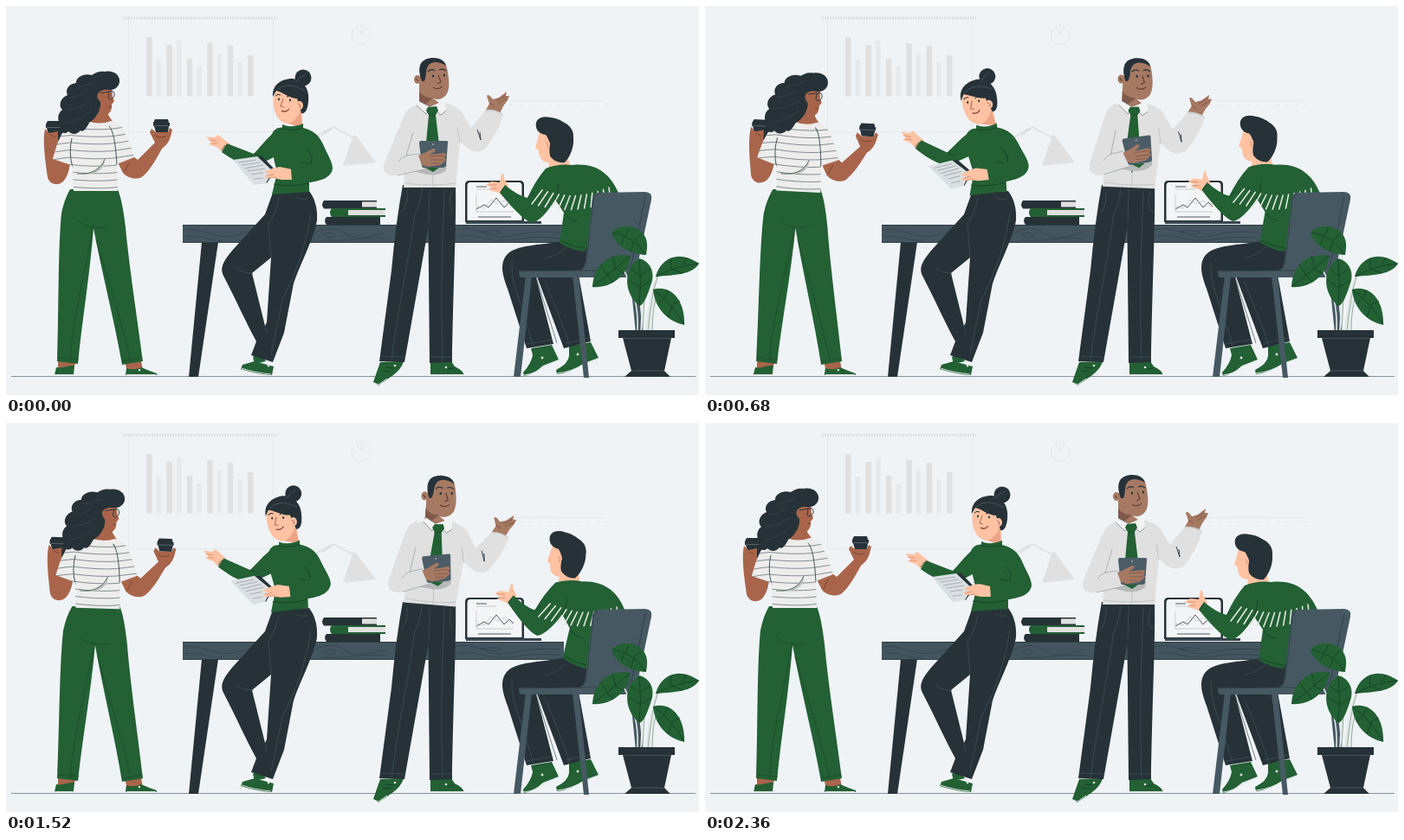
Animation, 800 px wide and 450 px high, one loop 2400 ms. Source, as an HTML page with a canvas:

```html
<!DOCTYPE html>
<html lang="en">
<head>
<meta charset="utf-8">
<title>Office meeting</title>
<style>
html, body { margin: 0; width: 100%; height: 100%; overflow: hidden; background: #eff3f6; }
canvas { display: block; width: 800px; height: 450px; }
</style>
</head>
<body>
<canvas id="stage" width="800" height="450"></canvas>
<script>
const ctx = document.getElementById("stage").getContext("2d");
const LOOP = 2400;
const DARK = "#263238", GREEN = "#236034", SLATE = "#465963", PAPER = "#eff3f6", GREY = "#e0e0e0",
  BROWN = "#a9654b", PEACH = "#ffc2a2", TAN = "#a67963", CREASE = "#43545c";

const cache = new Map();
function shape(d) {
  if (!cache.has(d)) cache.set(d, new Path2D(d));
  return cache.get(d);
}
function fill(color, ...paths) {
  ctx.fillStyle = color;
  for (const d of paths) ctx.fill(shape(d));
}
function line(color, width, ...paths) {
  ctx.strokeStyle = color;
  ctx.lineWidth = width;
  for (const d of paths) ctx.stroke(shape(d));
}
function box(color, x, y, w, h) {
  ctx.fillStyle = color;
  ctx.fillRect(x, y, w, h);
}
function dot(color, x, y, rx, ry = rx) {
  ctx.fillStyle = color;
  ctx.beginPath();
  ctx.ellipse(x, y, rx, ry, 0, 0, 7);
  ctx.fill();
}
// Draws a part turned around a joint and then shifted.
function turn(x, y, angle, dx, dy, draw) {
  ctx.save();
  ctx.translate(x + dx, y + dy);
  ctx.rotate(angle);
  ctx.translate(-x, -y);
  draw();
  ctx.restore();
}
function smooth(t, from, to) {
  const k = Math.min(1, Math.max(0, (t - from) / (to - from)));
  return k * k * (3 - 2 * k);
}
const sway = (t, a, b, c, d) => smooth(t, a, b) - smooth(t, c, d);

function backdrop() {
  box(PAPER, 0, 0, 800, 450);
  for (let i = 0; i < 11; i++) {
    const top = [36, 62, 45, 40, 61, 70, 43, 55, 46, 65, 57][i];
    box(i % 2 ? "#e7e9eb" : GREY, 162 + i * 11.7, top, i % 2 ? 5.5 : 6.5, 104.5 - top);
  }
  ctx.setLineDash([2, 1]);
  line("#e1e4e6", 1, "M141.5 16V145.5H308.5V16", "M578 109.5H692");
  line("#dde0e2", 3, "M135 14H313");
  line("#dde0e2", 1, "M403 26A10.5 10.5 0 1 0 417 26M406 22V28L410 32L414 28V22M410 20V33");
  ctx.setLineDash([5, 6]);
  line("#e6e9eb", 1, "M581 114.5H700");
  ctx.setLineDash([]);
  line("#d6d9db", 1.2, "M340 167L362 148L378 140L402 153M364 150L376 142");
  fill(GREY, "M401 149L404 150L427 181L389 185Z");
  line("#6d7980", .8, "M6 428.5H796");
}

function desk() {
  fill(DARK, "M226 273H245L222 429H211Z");
  box("#43565f", 204, 253, 440, 21);
  line("#2d3b43", 1, "M204 253.5H644M204 273.5H644");
  line("#33434b", .8,
    "M205 259C230 256 240 270 262 266S285 255 310 260M206 267C225 264 230 272 250 271",
    "M357 262C370 256 382 256 392 263S412 270 436 262M366 264C376 259 386 267 372 268Z",
    "M365 271C390 273 405 267 440 269M518 259C540 253 548 265 568 267S592 258 640 262",
    "M520 267C540 262 550 272 575 271S605 265 640 269M548 261C566 258 580 262 566 264Z");
  fill(DARK, "M367 225H428V234.5H367Q363 230 367 225Z", "M370 244H432V253H370Q366 248 370 244Z");
  fill(GREEN, "M376 234H438V244H376Q372 239 376 234Z");
  box(GREY, 411, 226.5, 17, 6);
  box(GREY, 395, 236, 43, 6);
  fill(DARK, "M535 202H593Q598 202 598 207V250H530V207Q530 202 535 202Z");
  fill("#f3f5f6", "M536 204H592Q595.5 204 595.5 208V248H532.5V208Q532.5 204 536 204Z");
  box("#37474f", 531, 249, 87, 3);
  line(DARK, .8, "M543 209H555M545 244H583", "M543 235L552 230L557 233L566 222L575 233L581 227L586 232");
  line("#aeb7bb", .6, "M543 212H566M543 238H586M544 232L552 234L560 224L568 229L575 225L585 233M543 218V238");
}

function coffeeCup(x, y) {
  fill(DARK, `M${x + 2} ${y}H${x + 17}L${x + 18} ${y + 4}H${x + 19}V${y + 8}H${x + 18}L${x + 17} ${y + 15}H${x + 3}L${x + 1} ${y + 8}H${x}V${y + 4}Z`);
  line("#6b777d", .7, `M${x + 1} ${y + 7.5}H${x + 18}`);
}

function coffeeWoman(p) {
  ctx.save();
  ctx.transform(1, 0, -5 * p / 202, 1, 5 * p / 202 * 415, 0);
  fill(BROWN, "M60 410H81L78 420L60 422Z", "M137 411H156L158 421L140 423Z");
  fill(GREEN, "M58 418C66 420 72 415 79 416L78 427H56Z", "M139 419Q148 422 156 418Q165 422 174 425V427H138Z");
  line("#dfe4e4", 1, "M56 426.5H78M139 426.5H173");
  dot(GREY, 154, 421, 1.3);
  fill(GREEN, "M74 212H129C134 225 136 240 138 256C142 300 152 365 158 411L134 415C125 363 111 310 101 257C97 310 88 362 83 414L59 411C61 350 60 280 64 240Q67 224 74 212Z");
  line("#1a4828", .7, "M83 248Q90 255 99 255Q109 258 117 254M100 255C96 290 77 355 74 412", "M60 407L84 409M134 411L157 407M104 270C118 320 137 374 144 412");
  ctx.restore();

  turn(100, 213, .06 * p, 5 * p, .7 * p, () => {
    coffeeCup(46, 133);
    fill(BROWN, "M44 149L45 142L50 147L60 145L63 149L61 156L58 163V174L74 182C73 191 70 199 66 203C59 209 50 206 48 198C46 183 43 165 44 149Z");
    fill(DARK, "M60 146L68 138L73 154L65 159L60 155Z");
    coffeeCup(170, 131);
    fill(BROWN, "M129 181L147 174L152 178L172 158L166 146L168 142L173 146L187 146L189 141L192 143L190 151C188 158 184 162 180 165C173 178 166 190 158 197C151 202 140 199 135 193Z",
      "M97 108L119 108L118 126L124 135Q108 142 92 134Z", "M104 97L122 94L123 105L125 110L122 114C123 124 116 128 108 125Z");
    line("#6f3d2d", .8, "M171 149L176 152L185 151M51 149L57 152M118 117L122 116M142 181L137 192");
    const tee = "M80 134Q86 132 94 133Q108 138 121 133Q129 134 133 139C140 151 145 164 148 175L128 183L129 214H78L77 185L72 183L54 177C57 165 63 147 70 140Z";
    fill("#ededec", tee);
    ctx.save();
    ctx.clip(shape(tee));
    for (let y = 141; y < 214; y += 8.5)
      line("#6b767a", .8, `M53 ${y + 3}Q64 ${y + 1} 74 ${y}Q102 ${y + 3} 124 ${y + 1}L150 ${y - 3}`);
    line("#43575a", 1, "M119 139Q126 146 128 184M76 153Q72 170 77 187");
    fill("#b9c1be", "M81 194C94 196 108 190 114 177C115 188 104 198 81 194Z");
    line("#425b50", .8, "M82 194C98 195 109 190 114 177");
    ctx.restore();
    fill(DARK, "M131 88C132 80 124 74 114 76C106 75 103 78 99 80C90 77 80 83 81 89C72 90 68 97 71 103C63 106 60 115 65 120C58 125 60 134 63 139C58 145 68 150 72 145C77 150 83 148 86 144C90 147 94 139 96 135C104 130 110 120 109 111Q104 106 106 101Q111 96 117 97C125 98 130 94 131 88Z");
    line("#3c4950", .7, "M83 94Q94 92 104 87M73 106Q87 105 96 96M70 120Q85 119 99 109M68 136Q85 133 99 120");
    line(DARK, .9, "M109 101L119 99M119 99Q126 97 125 104Q121 111 118 106Z");
  });
}

function notesWoman(p) {
  fill(GREEN, "M285 406L293 401L300 411L287 414Z", "M273 415L287 411L309 417L307 427Q290 426 271 420Z");
  line("#dfe4e4", 1, "M272 419Q286 424 306 426");
  dot(GREY, 303, 416, 1.4);
  fill(DARK, "M308 216L350 214C356 222 360 233 359 248C355 272 334 309 331 326L321 378L308 412L283 404L289 388C277 366 265 339 252 314C246 304 250 296 261 283L299 241Z");
  fill(PAPER, "M284 309L306 291L301 366L299 370Z");
  line(CREASE, .7, "M315 222Q311 242 303 252L306 291M348 223Q340 225 334 221M352 240Q345 290 319 340L306 403M285 309Q272 309 266 303M299 370L301 379");

  const torso = draw => turn(330, 215, -.065 * p, -2 * p, 0, draw);
  torso(() => {
    turn(318, 152, .148 * p, 0, 0, () => {
      fill(PEACH, "M231 151L241 152L245 149L250 153L259 160L252 171L243 163L234 160L237 157Z");
      line("#c78065", .7, "M234 155L243 156M237 159L244 159");
      fill(GREEN, "M322 139C308 143 296 161 286 171L255 159L249 169C260 177 273 184 282 185C292 184 304 178 318 170Z");
      line("#163e23", .7, "M286 171L296 174M253 161L249 167");
    });
  });
  turn(331, 137, -.23 * p, -7.5 * p, -.2 * p, () => {
    dot(DARK, 343, 83, 9.5);
    fill(PEACH, "M312 95Q307 107 309 117C311 129 317 135 326 136L342 141V116L338 100Z");
    fill("#eaa486", "M326 136Q336 132 340 121L342 140Z");
    fill(DARK, "M308 105C307 90 319 84 331 84C344 86 351 97 349 111C348 121 345 125 341 124L336 107C328 107 318 99 312 98Q310 101 308 105Z");
    dot(PEACH, 339, 115, 4, 5);
    line("#536067", .7, "M313 97Q325 86 345 98M334 88Q338 83 346 79");
    line(DARK, 1, "M311 104Q314 101 317 103M324 105Q328 102 332 105");
    dot(DARK, 315, 108, 1, 1.4);
    dot(DARK, 328, 109, 1, 1.4);
    line("#a65e49", .9, "M320 107L317 116L321 117M337 113Q341 114 339 118");
    line("#7a3029", 1.1, "M318 121Q323 124 327 119");
  });
  torso(() => {
    fill(GREEN, "M319 137Q330 142 343 136V141C356 144 362 151 366 160C371 172 377 180 377 188C375 199 364 202 350 204L350 215L307 218L313 193C310 177 302 157 308 146Q312 140 319 141Z");
    line("#153d22", .8, "M319 142Q331 145 343 141M309 206Q328 210 349 205M347 166Q357 175 351 184L331 190M340 181Q346 181 351 184");
    turn(330, 193, -.06 * p, 0, 0, () => {
      fill(DARK, "M289 175L296 174L311 190L301 205L297 202Z");
      fill("#dadfe2", "M262 178L290 174L308 191L300 205L286 207Z");
      line("#8f9a9f", .7, "M268 181L289 178M272 184L293 181M275 188L297 184M279 191L299 188M283 195L297 193M286 200L297 199");
      fill(PEACH, "M298 192L307 188L316 186L330 189V201L318 201L309 199L300 199L298 196L306 195Z");
      line("#c78065", .7, "M301 196L309 195M304 199L312 198");
      fill(GREEN, "M329 188L351 183L375 185C377 196 367 201 350 204L330 203Z");
    });
  });
}

function standingMan(body, head, arm) {
  fill(GREEN, "M432 412L459 411C455 425 440 431 430 439L424 435Z", "M490 411H514L518 417Q527 421 529 427H490Z");
  line("#dfe4e4", 1, "M425 436L430 438L440 431M490 426.5H529");
  line("#13351f", .8, "M438 418L447 419M435 422L444 423M510 420L517 419");
  dot(GREY, 449, 416, 1.3);
  dot(GREY, 508, 418, 1.3);
  fill(DARK, "M458 207H492L490 242L460 412L431 411L445 306Q450 250 458 207Z", "M487 207H519C520 250 517 300 515 412L489 413Z");
  line(CREASE, .7, "M489 212L488 250M480 211Q478 230 472 241C463 305 452 355 445 410M506 213Q501 325 504 411M463 213Q464 230 457 239M432 405L460 406M490 406H515M514 214Q509 232 517 239");

  const torso = draw => turn(489, 208, .085 * body, 0, 0, draw);
  torso(() => {
    fill(TAN, "M552 124L558 113L555 104Q557 101 562 108L569 106L578 99L577 104L581 104L579 109L574 116L569 126Z");
    line("#714a3a", .7, "M566 110L576 104M568 113L578 107M558 112L564 116");
    fill(GREY, "M475 114Q490 120 507 112Q521 116 526 123L537 141L554 120Q564 119 574 125C571 138 560 158 553 165C546 171 536 168 531 163L524 157L519 210H459L463 153L459 132Q463 117 475 114Z");
    line("#b9bfc0", .8, "M521 140L524 158M491 125L493 209M460 205Q490 209 519 205M554 121Q565 120 573 125");
    line(DARK, .9, "M544 143L548 155M547 146L548 155");
  });
  turn(489, 208, .089 * head, 0, 0, () => {
    dot(TAN, 475, 85, 4, 5);
    fill(TAN, "M481 67Q495 60 508 68C512 82 513 97 508 103C503 109 496 109 492 106L500 112L488 117L477 113V88Z");
    fill("#80594a", "M477 99Q483 107 493 106L484 114L477 113Z");
    fill(DARK, "M480 87C475 74 477 65 484 62C493 58 506 60 508 69Q502 65 495 65Q488 66 487 70C484 74 486 80 483 87Z");
    line(DARK, 1.2, "M487 76Q491 72 495 75M500 74Q504 72 508 75");
    dot(DARK, 493, 81, 1.2, 1.6);
    dot(DARK, 506, 80, 1.2, 1.6);
    line("#513329", 1, "M499 80L502 88L498 90M493 94Q498 98 504 93M473 84L476 87");
  });
  torso(() => {
    fill("#f1f2f2", "M477 110L490 117L485 125L474 115Z", "M501 111L507 111L508 121L502 126L492 118Z");
    line("#687579", .7, "M477 110L490 117L485 125L474 115M492 118L502 126L508 121");
    fill(GREEN, "M487 117L497 116L499 121L496 126L501 169L492 193L484 169L488 126L485 121Z");
    line("#163f24", .7, "M488 126L496 126");
  });
  turn(440, 188, -.11 * arm, 10 * arm, 0, () => {
    fill("#b6b9b9", "M478 184L509 183L508 190Q501 197 486 195L470 191Z");
    fill(GREEN, "M484 187L500 187L493 192Z");
    fill(GREY, "M474 115C464 117 460 126 457 133L437 181C433 192 440 198 452 196L483 189L477 171L463 173L470 151Z");
    line("#9da5a7", .8, "M470 146L462 173L477 171M463 173Q456 175 453 180M452 196L483 189");
    turn(493, 172, -.06 * arm, 0, 0, () => {
      fill("#4c5d67", "M479 156H508Q511 156 510 159L508 185Q507 187 504 187H482Q480 187 480 185L477 159Q477 156 479 156Z");
      dot("#9baab0", 493, 160, 1);
    });
    fill(TAN, "M476 173L483 170L493 165Q498 165 494 169L489 172L506 170Q510 172 506 175L508 178L505 181L501 184L487 186L480 184Z");
    line("#75503f", .7, "M489 174L506 173M490 178L506 178M490 182L501 182");
  });
}

function seatedMan(p) {
  fill(GREEN, "M606 396L630 392L638 409L620 416Q609 426 598 428L597 424Q606 414 608 404Z", "M650 393L675 389L684 407L668 413Q650 425 636 426L635 421Q649 414 650 405Z");
  line("#dfe4e4", 1, "M598 427Q613 425 621 417L637 410M636 425Q654 423 667 414L684 408");
  dot(GREY, 619, 407, 1.4);
  dot(GREY, 660, 403, 1.4);
  fill(DARK, "M610 305L661 311L675 388L644 396Z");
  fill(DARK, "M642 272C616 277 588 276 578 288C569 299 574 313 579 327L601 396L632 391L612 314L665 310L675 278Z");
  line(CREASE, .7, "M584 296Q583 318 593 342L609 393M648 278Q638 288 622 292M612 314L636 390M622 318Q640 360 651 393M601 391L630 386M646 390L673 384");

  turn(665, 275, .09 * p, 3.5 * p, 0, () => {
    fill(PEACH, "M554 207L560 203L570 204L572 194Q575 193 575 199L580 208L573 218L565 215L557 213L562 210Z");
    line("#c78065", .7, "M557 207L566 207M558 211L567 211");
    fill(PEACH, "M616 145L613 157L611 164L615 167C615 177 620 181 627 181L626 187Q638 190 651 185L646 164L626 145Z");
    fill(GREEN, "M623 188Q637 182 654 184C680 181 697 193 707 216L691 231L668 284Q653 283 639 274L644 239L634 224C626 237 617 248 608 251Q598 250 570 216L576 207Q590 219 602 222Q611 202 623 188Z");
    ctx.lineCap = "round";
    for (let i = 0; i < 13; i++) {
      const u = i / 12, x = 613 + 84 * u, y = 221 + 8 * Math.sin(u * Math.PI) - 3 * u;
      const slant = 6 - 7 * u;
      line("#e1e7df", 1.6, `M${x + slant} ${y - 8}L${x - slant} ${y + 8}`);
    }
    ctx.lineCap = "butt";
    line("#153d22", .8, "M602 222L609 216M634 224Q638 214 638 205M641 272Q654 279 668 280M575 210L571 215M645 240Q651 249 660 249");
    fill(DARK, "M613 143C608 131 618 126 629 129C638 130 643 134 648 137Q656 143 655 153C656 163 651 175 645 181Q635 182 629 175C625 168 631 159 623 149Q616 148 613 143Z");
    dot(PEACH, 624, 160, 4, 5.5);
    line("#c78065", .8, "M623 158Q627 158 625 164");
  });
}

function chair() {
  line(SLATE, 8, "M724 309L736 428");
  fill(SLATE, "M600 312H607L594 429H586Z", "M654 312H661L673 430H667Z");
  fill(SLATE, "M683 216L738 215Q747 216 745 224L729 300Q726 314 714 314H595Q592 314 592 306H662Q668 304 669 295L677 223Q678 217 683 216Z");
  line("#303f47", .9, "M683 217Q679 219 678 225L670 295Q669 304 661 306L592 307M662 306H711Q721 305 723 294L738 220");
}

function plant() {
  line("#e0e8e2", 1.6, "M733 376L736 318Q737 285 731 268M739 376Q743 333 752 311M743 376Q744 345 752 330M729 376Q731 335 711 302");
  line("#577460", .6, "M735 376L738 318M741 376Q745 333 753 311M746 376Q746 346 753 331");
  const leaves = [
    ["M699 263C706 252 727 252 736 264C742 272 740 281 739 288C721 287 704 278 699 263Z", "M700 262Q725 266 738 287M716 265L719 257M725 271L733 264M714 265L711 275M725 272L721 284"],
    ["M721 289C698 284 678 299 677 325C697 327 718 313 721 289Z", "M721 289Q701 306 677 325M704 304L700 289M694 311L686 299M703 304L714 310M694 311L701 320"],
    ["M731 292C743 295 751 308 744 324C740 336 736 346 731 347C713 332 712 304 731 292Z", "M731 293Q734 320 731 346M732 312L743 304M733 325L744 318M732 312L721 304M733 326L720 318"],
    ["M750 313C756 290 778 282 800 298C792 311 773 311 750 313Z", "M750 313Q774 300 800 298M767 304L768 293M781 300L786 291M768 304L781 309"],
    ["M747 328C765 322 784 337 783 369C764 365 749 350 747 328Z", "M747 328Q767 342 783 368M760 338L764 329M768 346L778 341M760 338L752 345M769 347L764 360"]
  ];
  for (const [blade, veins] of leaves) {
    fill(GREEN, blade);
    line("#153d22", .8, veins);
  }
  fill(DARK, "M707 375H772V384H768L760 422L767 429H714L722 422L712 384H707Z");
  line("#536168", .7, "M712 384.5H768M722 422H760");
}

function frame(now) {
  const t = now % LOOP;
  ctx.lineJoin = "round";
  backdrop();
  desk();
  coffeeWoman(sway(t, 0, 880, 1060, 1960));
  notesWoman(sway(t, 0, 900, 1080, 2040));
  standingMan(sway(t, 200, 1200, 1420, 2340), sway(t, 240, 1120, 1240, 2160), sway(t, 80, 920, 1060, 2040));
  seatedMan(sway(t, 320, 1180, 1480, 2160));
  chair();
  plant();
}

const start = performance.now();
function tick() {
  frame(performance.now() - start);
  requestAnimationFrame(tick);
}
tick();
</script>
</body>
</html>
```
